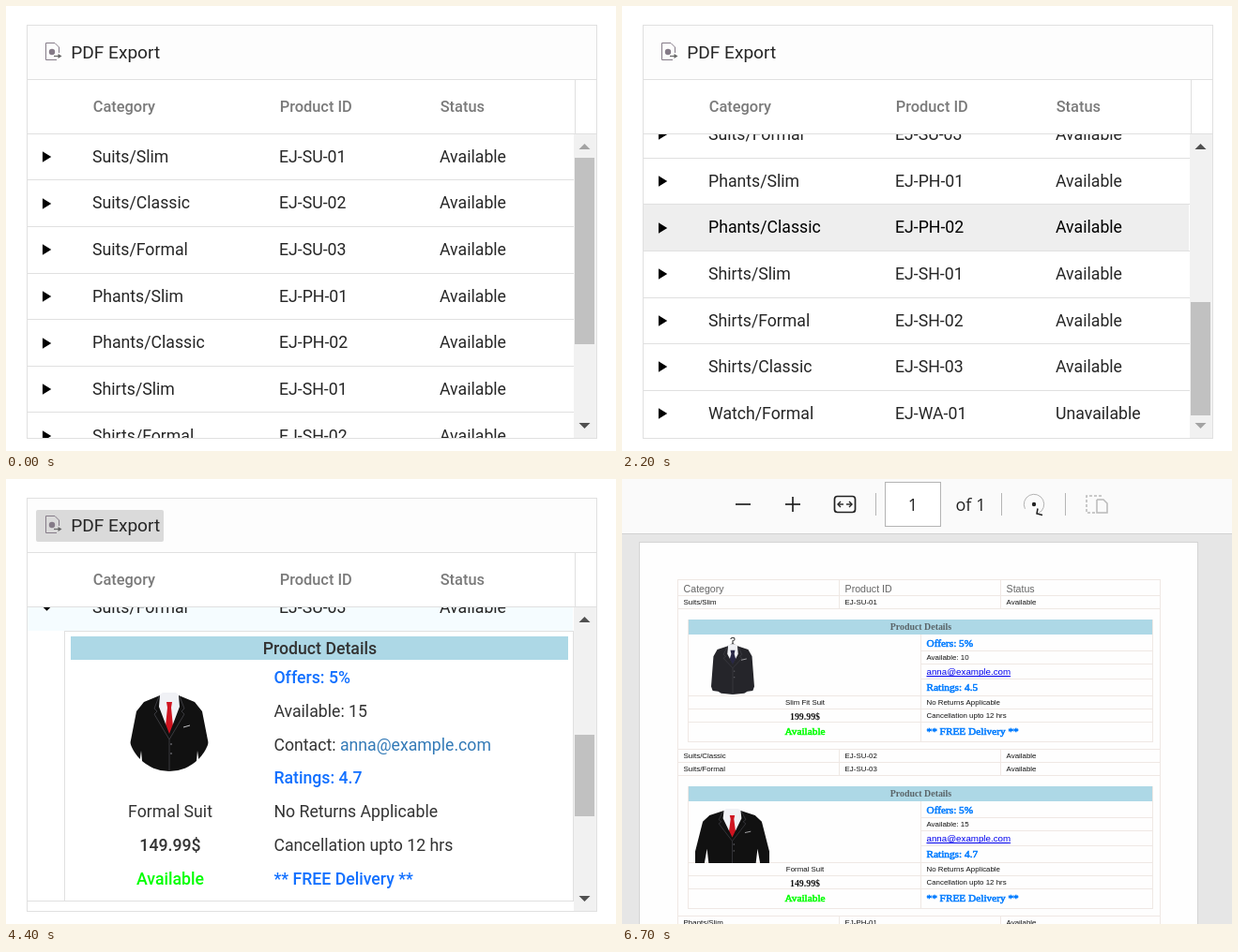
Animation of 650 by 475 pixels, one loop 8.6 s. Source, as an HTML page with a canvas:

```html
<!DOCTYPE html>
<html lang="en">
<head>
<meta charset="utf-8">
<title>Product grid export</title>
<style>
  html, body { margin: 0; width: 100%; height: 100%; overflow: hidden; background: #fff; }
  canvas { display: block; }
</style>
</head>
<body>
<canvas id="stage" width="650" height="475"></canvas>
<script>
const ctx = document.getElementById('stage').getContext('2d');
const LOOP = 8600, OUT = -1;
const ROBOTO = 'Roboto, sans-serif';
const SANS = '"Open Sans", sans-serif';
const ARIAL = '"Liberation Sans", Arial, sans-serif';
const TIMES = '"Liberation Serif", Times, serif';
const CELL = '17.7px ' + ROBOTO;
const INK = '#262626', BLUE = '#1270ff', LIME = '#00ff00', LINE = '#e0e0e0', BAR = '#add8e6';
const MAIL = 'anna@example.com';

const heads = ['Category', 'Product ID', 'Status'];
const kinds = { Suits: 'SU', Phants: 'PH', Shirts: 'SH', Watch: 'WA' };
const counts = {};
const rows = ['Suits/Slim', 'Suits/Classic', 'Suits/Formal', 'Phants/Slim', 'Phants/Classic',
  'Shirts/Slim', 'Shirts/Formal', 'Shirts/Classic', 'Watch/Formal'].map(name => {
  const code = kinds[name.split('/')[0]];
  counts[code] = (counts[code] || 0) + 1;
  return [name, `EJ-${code}-0${counts[code]}`, code === 'WA' ? 'Unavailable' : 'Available'];
});

const products = {
  0: { name: 'Slim Fit Suit', price: '199.99$', stock: 10, rating: '4.5', opens: 1200 },
  2: { name: 'Formal Suit', price: '149.99$', stock: 15, rating: '4.7', opens: 3200 }
};
const ROW_H = 49.65, DETAIL_H = 288, TOP = 136.1, VIEW_H = 324, TRACK_H = 275;
const SCROLL = 411;

// Height of the mouse pointer from each time on
const pointer = [[0, OUT], [300, 210], [800, 160], [1500, OUT], [2200, 236], [2400, 187],
  [2900, 150], [3500, OUT], [4100, 150], [4200, OUT], [4400, 50], [6100, OUT]];
const pointerAt = t => pointer.filter(([from]) => from <= t).pop()[1];

const infoLines = p => [
  ['big', 'Offers: 5%'],
  ['plain', 'Available: ' + p.stock],
  ['mail', MAIL],
  ['big', 'Ratings: ' + p.rating],
  ['plain', 'No Returns Applicable'],
  ['plain', 'Cancellation upto 12 hrs'],
  ['big', '** FREE Delivery **']
];

function rect(x, y, w, h, color) {
  ctx.fillStyle = color;
  ctx.fillRect(x, y, w, h);
}

function frame(x, y, w, h, color) {
  ctx.strokeStyle = color;
  ctx.lineWidth = 1;
  ctx.strokeRect(x + .5, y + .5, w - 1, h - 1);
}

function text(s, x, y, font, color, align = 'left') {
  ctx.font = font;
  ctx.fillStyle = color;
  ctx.textAlign = align;
  ctx.fillText(s, x, Math.round(y));
}

function trace(points) {
  ctx.beginPath();
  points.forEach(([x, y]) => ctx.lineTo(x, y));
}

function poly(points, color) {
  trace(points);
  ctx.fillStyle = color;
  ctx.fill();
}

function stroke(points, color, width = 1) {
  trace(points);
  ctx.strokeStyle = color;
  ctx.lineWidth = width;
  ctx.stroke();
}

function disc(x, y, r, color) {
  ctx.beginPath();
  ctx.arc(x, y, r, 0, 7);
  ctx.fillStyle = color;
  ctx.fill();
}

// Isosceles triangle; dir turns it in quarter steps from pointing right
function arrow(x, y, half, depth, dir, color) {
  ctx.save();
  ctx.translate(x, y);
  ctx.rotate(dir * Math.PI / 2);
  poly([[-depth / 2, -half], [depth / 2, 0], [-depth / 2, half]], color);
  ctx.restore();
}

const mirror = half => [...half, ...half.slice().reverse().map(([x, y]) => [-x, y])];

// Right half of each jacket, from the lapel crossing round to the hem
const slim = {
  w: 56, h: 93, neck: 7, top: 14, cloth: '#25252a', tie: '#292846', hanger: true,
  edge: [[0, 44], [7, 27], [6, 14], [20, 20], [25, 31], [28, 80], [26, 87], [19, 88], [15, 91], [0, 93]]
};
const formal = {
  w: 88, h: 84, neck: 11, top: 3, cloth: '#111', tie: '#cf1420',
  edge: [[0, 44], [11, 15], [10, 3], [27, 10], [35, 20], [44, 66], [44, 84], [33, 84], [30, 62], [28, 84], [0, 84]]
};

function suit(s, x, y, w, h, clipped) {
  const { neck, top, edge } = s;
  ctx.save();
  ctx.translate(x + w / 2, y);
  ctx.scale(w / s.w, h / s.h);
  if (clipped) {
    ctx.beginPath();
    ctx.arc(0, 40, 44, 0, 7);
    ctx.clip();
  }
  if (s.hanger) {
    ctx.beginPath();
    ctx.arc(0, 3, 2.5, Math.PI, Math.PI * 2.5);
    ctx.strokeStyle = '#444';
    ctx.lineWidth = 1.4;
    ctx.stroke();
    stroke([[0, 5], [0, 11]], '#444', 1.4);
    poly(mirror([[0, 9], [neck, top + 1]]), '#444');
  }
  poly(mirror([[0, 46], [neck, top + 12], [neck, top], [neck - 4, top - 3]]), '#f0f1f5');
  poly(mirror([[0, 46], [4, 36], [2, top + 13], [3, top + 7]]), s.tie);
  poly(mirror(edge), s.cloth);
  const lapel = [[0, 50], [neck + 5, top + 20], [neck + 2, top + 17], [neck + 5, top + 14], [neck, top + 1]];
  [lapel, lapel.map(([a, b]) => [-a, b])].forEach(l => stroke(l, '#45454b', .8));
  stroke([[0, 50], [0, s.h]], '#45454b', .8);
  stroke([[neck + 4, 37], [neck + 11, 35]], '#c4c4c8', 1);
  [55, 65].forEach(b => disc(2, b, 1, '#606066'));
  ctx.restore();
}

function toolbar(t, mouse) {
  rect(23, 21, 606, 57, '#fdfdfd');
  if (mouse > 33 && mouse < 67) {
    const pressed = t >= 5200 && t < 5300;
    ctx.beginPath();
    ctx.roundRect(32, 33, 136, 34, 2);
    ctx.fillStyle = pressed ? '#c4c4c4' : '#dadada';
    ctx.fill();
  }
  const c = '#857b88';
  stroke([[54, 57.5], [42.5, 57.5], [42.5, 39.5], [52, 39.5], [56.5, 44], [56.5, 50]], c);
  disc(49, 49, 3.2, c);
  stroke([[51, 53.5], [57, 53.5]], '#666', 1.2);
  arrow(57.5, 53.5, 2.5, 4, 0, '#666');
  text('PDF Export', 69.2, 56, '19.1px ' + ROBOTO, INK);

  [78, 136].forEach(y => rect(23, y, 606, 1, LINE));
  rect(606, 79, 1, 57, LINE);
}

const cols = [92, 291, 462];

function detail(i, top) {
  const p = products[i], y0 = Math.floor(top);
  const bold = '500 ' + CELL;
  const base = n => top + 56 + 35.8 * n;
  rect(62, y0, 543, 1, LINE);
  [62, 604].forEach(x => rect(x, y0, 1, DETAIL_H, LINE));
  rect(69, Math.round(top + 6.2), 530, 25, BAR);
  text('Product Details', 334.4, top + 25.2, bold, '#333', 'center');

  infoLines(p).forEach(([kind, s], n) => {
    let x = 285.4;
    if (kind === 'mail') {
      text('Contact: ', x, base(n), CELL, '#333');
      x += ctx.measureText('Contact: ').width;
    }
    const color = { big: BLUE, plain: '#333', mail: '#337ab7' }[kind];
    text(s, x, base(n), kind === 'big' ? bold : CELL, color);
  });
  text(p.name, 175, base(4), CELL, '#333', 'center');
  text(p.price, 175, base(5), bold, '#333', 'center');
  text('Available', 175, base(6), bold, LIME, 'center');
  if (i === 0) suit(slim, 147, y0 + 57, 56, 93);
  else suit(formal, 130, y0 + 66, 88, 84, true);
}

// The wheel moves the list in four ticks
function scrollAt(t) {
  const k = Math.max(0, Math.min(4, Math.floor((t - 1800) / 100))) / 4;
  return SCROLL * k * k * (3 - 2 * k);
}

function scrollbar(pos, content) {
  const unit = TRACK_H / content;
  const shade = on => on ? '#505050' : '#a3a3a3';
  rect(605, 137, 24, 324, '#f1f1f1');
  rect(606, Math.round(162 + pos * unit), 21, Math.round(VIEW_H * unit), '#c1c1c1');
  arrow(616.5, 150, 6, 6, 3, shade(pos > 0));
  arrow(616.5, 448, 6, 6, 1, shade(pos + VIEW_H < content - 1));
}

function list(t, mouse) {
  const pos = scrollAt(t);
  let top = TOP - pos;
  ctx.save();
  ctx.beginPath();
  ctx.rect(23, 137, 582, 324);
  ctx.clip();
  rows.forEach((cells, i) => {
    const y0 = Math.floor(top), h = Math.floor(top + ROW_H) - y0;
    const lit = mouse > 137 && mouse >= top && mouse < top + ROW_H;
    const open = products[i] && t >= products[i].opens;
    if (lit) rect(23, y0, 581, h, '#eee');
    else if (open && i === 2) rect(23, y0, 581, h, '#f5fcff');
    rect(23, y0, 582, 1, LINE);
    const cy = Math.round(top + 24.8);
    if (open) arrow(43.5, cy, 7.5, 7.4, 1, '#000');
    else arrow(43.6, cy, 5.7, 9.3, 0, '#000');
    cells.forEach((s, k) => text(s, cols[k], top + 30.7, CELL, lit ? '#000' : INK));
    top += ROW_H;
    if (open) {
      detail(i, top);
      top += DETAIL_H;
    }
  });
  ctx.restore();
  scrollbar(pos, top + pos - TOP);
}

function grid(t) {
  const mouse = pointerAt(t);
  frame(22, 20, 608, 442, LINE);
  toolbar(t, mouse);
  heads.forEach((s, k) => text(s, cols[k] + .7, 113, '500 16.4px ' + ROBOTO, '#7a7a7a'));
  list(t, mouse);

  if (t >= 5000 && t < 5300) {
    rect(139, 72, 113, 38, '#fff');
    frame(139, 72, 113, 38, '#b8b8b8');
    text('PDF Export', 150, 97, '17px ' + SANS, '#575757');
  }
  if (t >= 5600) [24, 178].forEach(y => disc(632, y, 46, 'rgba(0,0,0,.02)'));
}

function viewerBar() {
  const c = '#222', pale = '#b9b9b9';
  rect(0, 0, 650, 58, '#fafafa');
  rect(0, 58, 650, 1, '#d2d2d2');
  [129, 182].forEach(x => stroke([[x - 8, 27], [x + 8, 27]], c, 1.7));
  stroke([[182, 19], [182, 35]], c, 1.7);

  ctx.beginPath();
  ctx.roundRect(226.5, 18.5, 22, 17, 3);
  ctx.stroke();
  [-1, 1].forEach(d => {
    const x = 237.5 + d * 7.5;
    stroke([[237.5 + d * 1.5, 27], [x, 27]], c, 1.4);
    stroke([[x - d * 3, 24], [x, 27], [x - d * 3, 30]], c, 1.4);
  });

  [270, 404, 472].forEach(x => rect(x, 15, 1, 24, '#b5b5b5'));
  rect(280, 3, 60, 48, '#fff');
  frame(280, 3, 60, 48, '#b4b4b4');
  text('1', 310, 34, '18px ' + SANS, c, 'center');
  text('of 1', 355.5, 34, '18px ' + SANS, c);

  ctx.beginPath();
  ctx.arc(439, 27, 10.7, Math.PI * .85, Math.PI * 2.4);
  ctx.stroke();
  stroke([[443, 31.5], [442, 37], [448, 38.5]], c, 1.5);
  disc(439, 27, 2.2, c);

  stroke([[506, 22], [513, 22], [517, 26], [517, 36], [506, 36], [506, 22]], pale, 1.5);
  ctx.setLineDash([3, 2]);
  stroke([[511, 18], [495, 18], [495, 36], [504, 36]], pale, 1.5);
  ctx.setLineDash([]);
}

function thick(s, x, y, color, align = 'left') {
  text(s, x, y, '11.3px ' + TIMES, color, align);
  ctx.strokeStyle = color;
  ctx.lineWidth = .6;
  ctx.strokeText(s, x, Math.round(y));
}

const EDGE = '#efe8e4', SMALL = '7.9px ' + ARIAL, SHEET_DETAIL = 150;

function sheetDetail(i, y) {
  const p = products[i], bold = 'bold 9.9px ' + TIMES;
  const heights = { big: 17.5, plain: 14, mail: 16 };
  const x = 324.5, end = y + 130;
  frame(70, y, 496, 131, EDGE);
  rect(71, y, 494, 16, BAR);
  text('Product Details', 318.5, y + 11, bold, '#5a6468', 'center');
  rect(318, y + 16, 1, 114, EDGE);

  let top = y + 16;
  infoLines(p).forEach(([kind, s], n) => {
    const bottom = n === 6 ? end : top + heights[kind];
    const mid = (top + bottom) / 2;
    // The left column has text only beside the last three lines
    rect(n < 3 ? 318 : 71, Math.floor(bottom), n < 3 ? 247 : 494, 1, EDGE);
    if (kind === 'big') thick(s, x, mid + 3.8, '#007bff');
    else if (kind === 'plain') text(s, x, mid + 2.7, SMALL, '#111');
    else {
      text(s, x, mid + 3.4, '9.75px ' + ARIAL, '#0000ee');
      rect(x, Math.round(mid + 4.4), ctx.measureText(s).width, 1, '#0000ee');
    }
    if (n === 4) text(p.name, 195, mid + 2.7, SMALL, '#111', 'center');
    if (n === 5) text(p.price, 195, mid + 4.8, bold, '#111', 'center');
    if (n === 6) thick('Available', 195, mid + 3.8, LIME, 'center');
    top = bottom;
  });
  if (i === 0) suit(slim, 95, y + 19, 46, 61);
  else suit(formal, 78, y + 24, 79, 58);
}

function sheet() {
  rect(0, 59, 650, 416, '#e6e6e6');
  rect(18, 67, 596, 408, '#d4d4d4');
  rect(19, 68, 594, 407, '#fefefe');
  viewerBar();
  [59, 573].forEach(x => rect(x, 107, 1, 368, EDGE));

  let y = 107;
  const band = (cells, h, base, font, color) => {
    [y, y + h].forEach(v => rect(59, v, 515, 1, EDGE));
    cells.forEach((s, k) => {
      const x = 59 + 172 * k;
      rect(x, y, 1, h, EDGE);
      text(s, x + 6.6, y + base, font, color);
    });
    y += h;
  };
  band(heads, 17, 14, '10.6px ' + ARIAL, '#666');
  for (let i = 0; y < 475; i++) {
    band(rows[i], 14, 10, SMALL, '#111');
    if (products[i]) {
      sheetDetail(i, y + 12);
      y += SHEET_DETAIL;
    }
  }
}

function draw(now) {
  const t = now % LOOP;
  rect(0, 0, 650, 475, '#fff');
  if (t < 6700) grid(t);
  else sheet();
}

let start;
function tick(now) {
  if (start === undefined) start = now;
  draw(now - start);
  requestAnimationFrame(tick);
}
draw(0);
requestAnimationFrame(tick);
</script>
</body>
</html>
```
